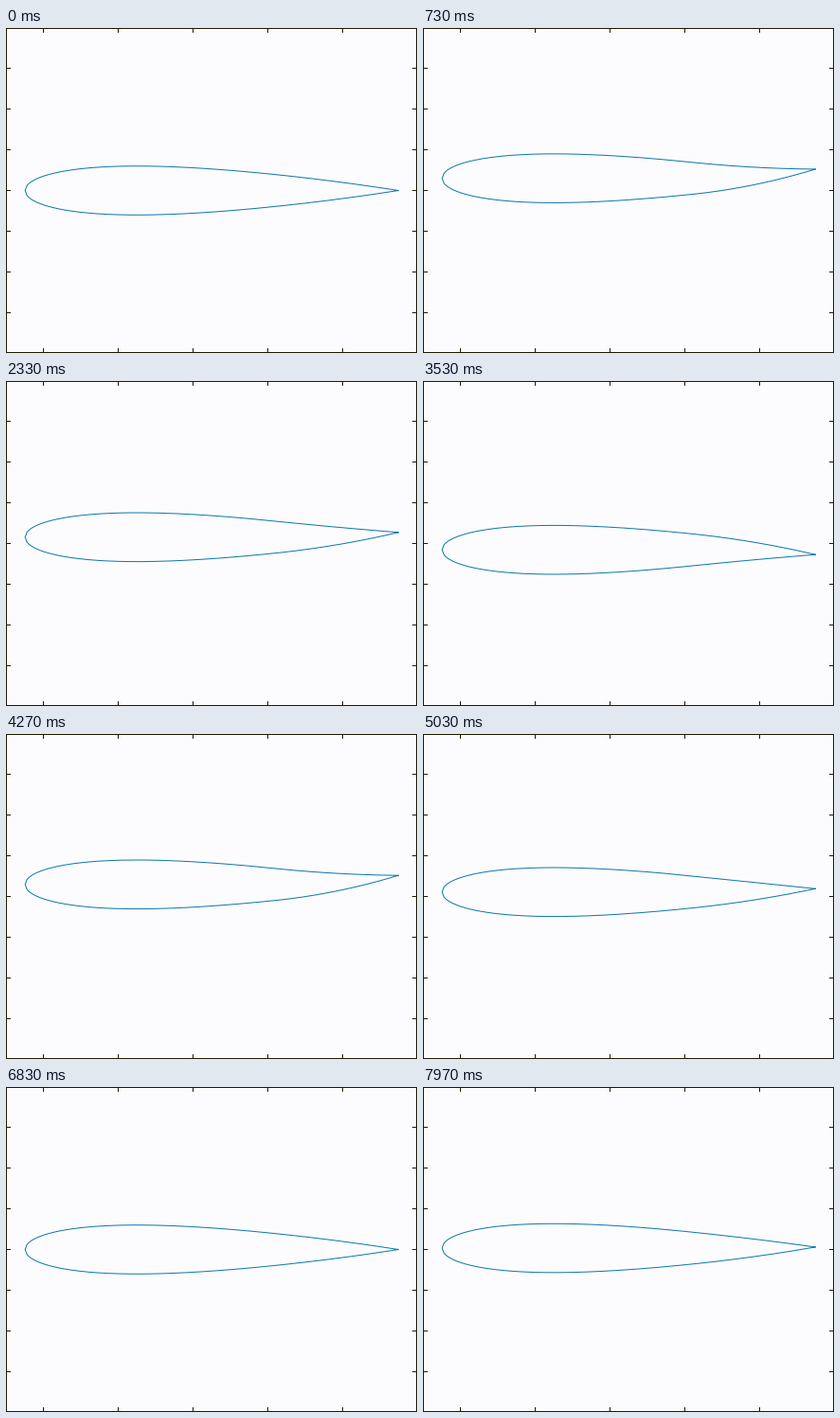
Write a matplotlib script that moves like this. It is 434 by 343 pixels and loops after 8 s.

```python
import matplotlib.pyplot as plt
import numpy as np
from matplotlib.animation import FuncAnimation
from matplotlib.patches import Rectangle

W, H, DPI = 434, 343, 100
TICK_MS, LOOP_MS = 20, 8000
FPS = 30                           # poses per second, held between ticks

PAPER, INK, BLUE = "#fcfcfe", "#1c1c00", "#0c78ac"
PX = 72 / DPI                      # one pixel in points

NOSE, CHORD, MID = 20.2, 394, 171.5
THICK = 25.8                       # half thickness in pixels
HEAVE = 13.0                       # heave amplitude in pixels
HINGE, TAIL = 0.67, 0.75           # tail bends aft of the hinge

# Phase of the flutter in half turns at a few poses
KEY_POSES = [0, 43, 70, 106, 151, 205, 239]
KEY_TURNS = [0, 6.931, 11.828, 18.172, 25.118, 34, 39.964]

x = np.linspace(0, 1, 201)
half = (0.2969 * np.sqrt(x) - 0.1260 * x - 0.3516 * x**2
        + 0.2843 * x**3 - 0.1036 * x**4)
half *= THICK / half.max()
mode = 1 + TAIL * np.clip((x - HINGE) / (1 - HINGE), 0, None) ** 2

fig = plt.figure(figsize=(W / DPI, H / DPI), dpi=DPI, facecolor=PAPER)
ax = fig.add_axes([0, 0, 1, 1])
ax.set_xlim(0, W)
ax.set_ylim(H, 0)
ax.axis("off")


def bar(left, top, width, height):
    ax.add_patch(Rectangle((left, top), width, height, facecolor=INK,
                           linewidth=0, antialiased=False, snap=False,
                           zorder=3))


def draw_box(tick=5):
    for left in (0, W - 1):
        bar(left, 0, 1, H)
    for top in (0, H - 1):
        bar(0, top, W, 1)
    for left in range(39, W - 1, 79):
        bar(left, 0, 1, tick)
        bar(left, H - tick, 1, tick)
    for top in range(42, H - 1, 43):
        if top < H - 10:
            bar(0, top, tick, 1)
            bar(W - tick, top, tick, 1)


def outline(pose):
    turns = np.interp(pose, KEY_POSES, KEY_TURNS)
    camber = MID + HEAVE * np.sin(np.pi * turns) * mode
    xs = NOSE + CHORD * x
    return (np.r_[xs[::-1], xs[1:]],
            np.r_[(camber - half)[::-1], (camber + half)[1:]])


draw_box()
foil, = ax.plot([], [], color=BLUE, lw=PX, solid_joinstyle="round")


def update(n):
    foil.set_data(*outline(round(n * TICK_MS * FPS / 1000)))
    return foil,


update(0)
anim = FuncAnimation(fig, update, frames=LOOP_MS // TICK_MS,
                     interval=TICK_MS, repeat=True, repeat_delay=0,
                     blit=False)
plt.show()
```
